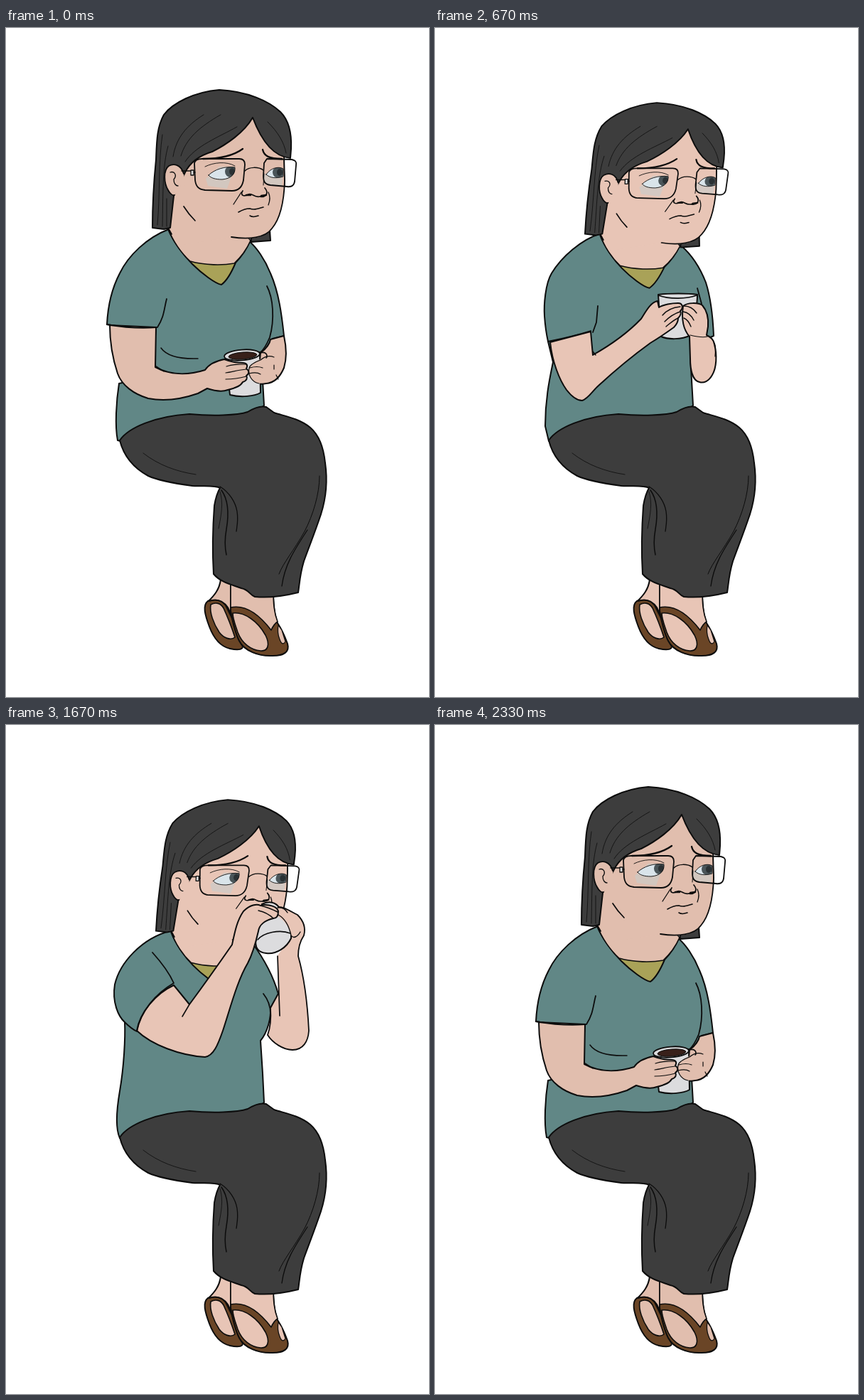
An HTML page with a canvas for the animation above (3840 ms loop, 595 by 941 pixels).

```html
<!DOCTYPE html>
<html lang="en">
<head>
<meta charset="utf-8">
<title>Coffee break</title>
<style>
  html, body { margin: 0; width: 100%; height: 100%; overflow: hidden; background: #fff; }
  canvas { display: block; }
</style>
</head>
<body>
<canvas id="stage" width="595" height="941"></canvas>
<script>
const ctx = document.getElementById('stage').getContext('2d');
const LOOP = 3840;
const INK = '#0c0c0c', DARK = '#3d3d3d', TEAL = '#618786', OLIVE = '#a9a258',
      BROWN = '#6a4526', CUP = '#dcdcde', COFFEE = '#38201a';
let skin;

function shape(d, fill, width = 2) {
  const path = new Path2D(d);
  if (fill) { ctx.fillStyle = fill; ctx.fill(path); }
  if (width) { ctx.lineWidth = width; ctx.strokeStyle = INK; ctx.stroke(path); }
}
const line = (d, width = 1.8) => shape(d, null, width);

function oval(x, y, rx, ry, tilt, fill, width = 0) {
  ctx.beginPath();
  ctx.ellipse(x, y, rx, ry, tilt, 0, Math.PI * 2);
  ctx.fillStyle = fill;
  ctx.fill();
  if (width) { ctx.lineWidth = width; ctx.strokeStyle = INK; ctx.stroke(); }
}

function within(matrix, draw) {
  ctx.save();
  ctx.transform(...matrix);
  draw();
  ctx.restore();
}

function feet() {
  shape('M284 806C296 802 304 805 309 812L318 830L331 866C337 874 328 876 315 873C302 870 292 858 286 842C280 826 276 812 284 806Z', BROWN);
  shape('M288 811C295 807 302 809 306 816C312 829 318 845 322 857C316 862 306 858 300 850C292 838 286 822 288 811Z', skin, 1.6);
  shape('M302 776C300 790 293 798 285 806C297 802 306 806 312 815L317 826V776Z', skin);
  shape('M316 776V820C319 836 322 850 328 862C335 876 355 884 375 883C392 883 399 877 396 866C392 855 388 846 382 837C377 825 376 810 376 790Z', BROWN);
  shape('M316 776V815C335 811 354 822 373 847C376 840 379 837 382 835C377 822 376 810 376 790Z', skin, 1.6);
  shape('M319 823C335 821 354 834 365 854C372 868 368 877 358 876C345 875 332 866 326 850C322 838 319 831 319 823Z', skin, 1.6);
  shape('M383 840L388 847L393 863C390 868 387 866 385 860C382 853 382 846 383 840Z', skin, 1.2);
}

function legs() {
  feet();
  shape('M160 580C172 562 210 546 258 543C290 546 325 545 340 540C348 535 358 531 366 533L377 541C392 546 412 549 428 562C442 574 447 592 449 612C453 640 450 662 443 684C435 708 427 728 419 750C413 770 413 782 411 794C395 798 370 802 350 800C342 797 342 790 331 788C318 783 302 780 292 768C290 735 291 700 293 672C295 660 298 652 301 647C295 643 280 645 262 644C240 641 215 637 200 630C178 618 165 600 160 580Z', DARK);
  line('M301 645C314 653 323 667 325 680C327 692 325 700 324 708', 1.3);
  line('M303 650C313 664 314 682 310 705C307 722 308 732 310 741', 1.5);
  line('M301 652C306 668 303 684 299 704', .8);
  line('M193 598C215 615 240 624 267 628', .8);
  line('M441 630C441 655 432 685 420 708C405 735 390 752 384 768', 1);
  line('M424 706C405 735 392 755 388 785', 1.3);
}

function torsoLow() {
  shape('M229 283C198 295 172 320 160 345C148 368 143 395 142 417C165 421 190 423 211 421L205 490L159 500C155 525 153 560 157 580L161 581C200 575 320 570 363 531L359 460L375 437L391 433C388 405 384 372 372 345C364 325 352 308 342 300Z', TEAL);
  line('M226 381C222 396 223 405 213 421');
  line('M218 450C225 460 240 466 270 465', 1.5);
  line('M367 363C376 380 378 410 371 435C366 447 361 454 357 457');
}

function torsoMid() {
  shape('M233 289C205 298 178 322 164 345C155 360 153 390 154 405C155 420 157 432 159 441L166 470C162 490 155 520 155 560L160 581C200 575 320 570 363 531L359 460L383 437L392 433C391 410 388 380 381 358C372 335 360 318 346 306Z', TEAL);
  line('M159 441C178 437 200 432 219 426');
  line('M229 391L227 414L222 428');
  line('M369 366L375 388');
}

function torsoHigh() {
  shape('M233 289C190 300 160 335 153 365C149 390 158 410 167 418C168 440 166 480 160 515C154 550 155 570 160 581C200 575 320 570 363 531L361 490L358 444C368 432 373 412 372 398L383 378C375 350 360 325 346 306Z', TEAL);
  line('M362 378C370 388 372 398 372 406');
}

function lens(d, reflection, eye, pupilX, pupilY) {
  ctx.save();
  ctx.clip(new Path2D(d));
  shape(reflection, 'rgba(200,205,203,.6)', 0);
  ctx.clip(new Path2D(eye));
  shape(eye, '#d9e4ea', 0);
  oval(pupilX, pupilY, 8, 8, 0, '#4a5559');
  oval(pupilX + 2, pupilY, 4, 5, 0, '#2a3134');
  ctx.restore();
  line(eye, .9);
  line(d, 1.8);
}

function face() {
  shape('M344 288L371 284L372 299L345 301Z', DARK);
  shape('M228 283C235 300 250 320 262 332C275 345 295 360 303 361C310 356 318 342 323 330C333 320 339 310 343 300Z', OLIVE);
  shape('M228 281C234 300 248 318 259 328C280 334 305 334 321 331C335 318 340 308 344 299L320 270L240 250Z', skin, 1.6);
  shape('M347 124L255 180L236 235L230 283L250 305L318 294C328 297 342 297 352 295C363 293 371 286 376 279C386 265 391 245 392 215L391 178Z', skin, 0);
  line('M391 178L392 215C391 245 386 268 374 282C365 295 342 298 317 294');
  line('M229 283L233 290');

  shape('M206 281C206 250 208 215 211 185C212 160 212 140 222 122C235 105 265 90 300 87C340 89 370 103 386 118C398 130 402 150 401 170L400 183C376 181 359 158 347 126C335 147 310 164 290 174C270 180 258 191 252 203L236 236L231 281L222 283Z', DARK);
  line('M325 139C300 153 266 166 252 188M302 122C272 139 253 156 246 180M278 122C254 137 239 155 235 181M368 132C382 146 391 160 394 176', .8);
  line('M220 150C214 190 217 230 213 277M228 166C220 195 221 230 220 279M226 240L226 279', .8);

  shape('M250 205C246 192 236 190 229 194C221 200 222 218 228 228C231 234 235 236 237 235L252 220Z', skin, 0);
  line('M250 205C246 192 236 190 229 194C221 200 222 218 228 228C231 234 235 236 237 235');
  line('M231 203C237 201 241 207 236 213C236 219 239 222 242 222', 1.3);

  lens('M265 190C266 185 270 184 276 184H328C334 184 336 187 336 192L334 214C332 225 326 229 318 229L280 228C270 227 267 222 266 214Z',
       'M281 212L300 195H322L311 226L284 222Z',
       'M285 207C293 199 308 194 322 196C323 206 316 212 304 213C294 213 288 211 285 207Z', 316, 202);
  lens('M367 184L402 185C407 186 409 188 408 193L406 216C405 222 401 224 395 223L372 221C364 220 362 216 362 208L363 190Z',
       'M362 206L390 197L388 224H362Z',
       'M366 206C372 197 383 194 390 198L390 209C380 212 371 211 366 206Z', 383, 203);
  shape('M393 187H402Q407 188 406 193L404 216Q402 222 394 221Z', '#fff', 0);
  line('M391 186L392 222', 1.2);
  line('M280 195C292 189 310 187 322 194', .9);
  line('M247 201H260M264 203H266M336 201C342 195 355 195 362 200', 1.5);
  shape('M260 200H264V207H260Z', '#ddd', 1.3);

  line('M277 184C299 184 318 181 333 170', 2.3);
  line('M361 171C363 180 370 184 388 184', 2.3);
  line('M363 205L362 221', 1);
  line('M333 229C329 235 334 238 341 234C347 232 349 239 357 237C364 239 371 233 364 225', 1.7);
  line('M338 235L344 235M359 236L366 235', 2.5);
  line('M331 231L320 248M369 231C372 237 371 244 369 249', 1.3);
  line('M327 259C332 256 338 254 343 254C348 256 352 255 362 252M343 264C348 267 352 265 355 264', 1.6);
  line('M250 251C255 259 260 265 266 271', 1.7);
}

function armsLow() {
  shape('M391 433C394 447 395 465 391 478C386 490 378 499 366 500C355 502 346 499 341 490L343 474L357 466L358 457C366 451 371 444 372 438Z', skin);
  shape('M308 460L315 516C330 520 350 518 358 513L357 456Z', CUP);
  oval(332, 460, 25, 7.5, -.08, CUP, 1.8);
  oval(333, 461, 20, 5, -.08, COFFEE, 1);
  line('M357 457C364 455 369 458 366 465', 1.7);
  shape('M358 466C348 470 340 475 341 482C342 492 347 499 356 500L370 498L384 478L376 463Z', skin, 0);
  line('M377 463C370 460 364 462 358 467C350 470 342 474 342 479C340 487 345 498 356 500M343 478C350 476 356 476 361 478M342 486C350 484 355 485 358 487M380 488L383 494M377 474L377 480', 1.2);
  shape('M146 418C146 440 150 465 157 486C163 503 180 515 200 521C225 526 250 521 270 514L283 507C292 510 304 512 312 509C321 507 330 504 333 498C339 496 340 492 338 489C343 486 342 482 338 479C341 474 338 471 333 471C324 471 315 469 307 466C297 468 286 472 280 481C255 489 230 488 210 477L211 421Z', skin);
  line('M338 473C326 473 318 473 310 476M338 480C326 481 318 484 309 485M338 490C327 493 318 494 309 494', 1.2);
  line('M210 475L222 483', 1.5);
  line('M142 417C165 421 190 423 212 421');
}

function armsMid() {
  shape('M314 375C330 373 355 373 369 375C369 390 364 420 360 432C346 439 327 438 318 434Z', CUP);
  line('M314 376C330 382 355 381 368 376', 1.6);
  shape('M349 391C355 386 370 386 376 390C383 398 385 408 384 420L382 432C388 435 392 438 393 445C397 460 396 478 390 488C385 497 378 500 372 498C362 496 359 480 359 465L358 434C350 425 346 412 349 391Z', skin);
  line('M350 391C357 391 364 395 368 401M349 399C356 400 361 405 364 411M350 408C355 410 358 415 360 420', 1.4);
  line('M383 434C376 436 367 434 359 432', 1.2);
  line('M393 443C396 450 394 457 394 462', 1.2);
  shape('M162 442C165 470 175 495 185 509C192 518 200 524 207 524C215 522 222 510 230 503C255 480 285 456 303 443C313 437 325 429 336 421C341 416 342 411 342 408C346 404 346 400 345 398C350 393 348 387 342 387C333 387 321 389 315 393L313 384C303 386 297 398 290 409C270 430 245 447 222 460L219 427Z', skin);
  line('M345 392C334 393 325 398 320 404M345 399C335 402 329 407 323 413M342 408C335 411 330 416 325 420', 1.4);
  line('M222 455L226 460', 1.4);
}

function armsHigh() {
  const forearm = 'M382 256C390 255 400 262 410 267C418 275 422 285 419 296C413 305 411 315 411 325C418 350 424 390 426 430C425 445 418 457 403 457C390 457 375 447 368 436C372 425 373 412 372 398L383 378';
  shape(forearm + 'L382 325C386 315 400 308 402 297Z', skin, 0);
  line(forearm);
  line('M382 325L385 409', 1.7);
  shape('M360 252C370 247 380 249 385 258C396 270 402 285 401 300C395 313 380 323 366 321C355 320 349 313 352 300Z', CUP);
  line('M354 302C362 292 385 287 400 293', 1.6);
  shape('M380 258C387 255 393 259 397 264C404 271 411 280 414 289C409 297 403 300 401 296C398 282 390 274 382 269Z', skin, 0);
  line('M382 257C388 256 393 259 396 264M383 267C392 272 398 282 401 296C404 301 410 298 414 291', 1.4);
  shape('M184 430C188 405 210 378 236 366L258 393C275 370 300 335 318 309C322 290 325 275 334 262C343 253 353 251 358 254C370 251 382 256 383 262C383 269 380 272 376 272C363 275 356 282 355 290C352 303 348 320 340 335C325 360 315 400 305 430C298 450 292 465 280 467C245 465 205 450 184 430Z', skin);
  line('M258 393L248 410', 1.6);
  line('M358 254C367 256 376 260 382 263M355 261C364 263 371 267 376 272', 1.4);
  line('M206 320C215 330 228 345 236 363C210 378 190 402 184 431C176 427 171 422 167 418');
}

const UPRIGHT = [1, 0, 0, 1, 0, 0];
const BOWED = [.975, 0, -.048, .951, 23.6, 22.4];
const PALE = '#e8c5b6', WARM = '#e1beae';
const poses = {
  rest:  { skin: WARM, head: UPRIGHT, torso: torsoLow, arms: armsLow },
  bow:   { skin: PALE, head: BOWED, torso: torsoLow, arms: armsLow },
  lift:  { skin: PALE, head: BOWED, torso: torsoMid, arms: armsMid },
  sip:   { skin: PALE, head: BOWED, torso: torsoHigh, arms: armsHigh },
  gulp:  { skin: WARM, head: [1, 0, 0, 1, 3, 6], torso: torsoHigh, arms: armsHigh, raise: [1, 0, 0, 1, -4, -6] }
};
const timeline = [
  [2330, 'rest'], [2000, 'lift'], [1670, 'sip'], [1330, 'gulp'],
  [1000, 'sip'], [670, 'lift'], [330, 'bow'], [0, 'rest']
];

function render(time) {
  const pose = poses[timeline.find(([start]) => time >= start)[1]];
  skin = pose.skin;
  ctx.fillStyle = '#fff';
  ctx.fillRect(0, 0, 595, 941);
  ctx.lineCap = ctx.lineJoin = 'round';
  pose.torso();
  legs();
  within(pose.head, face);
  within(pose.raise || UPRIGHT, pose.arms);
}

const begin = performance.now();
function tick() {
  render(Math.max(0, performance.now() - begin) % LOOP);
  requestAnimationFrame(tick);
}
tick();
</script>
</body>
</html>
```
